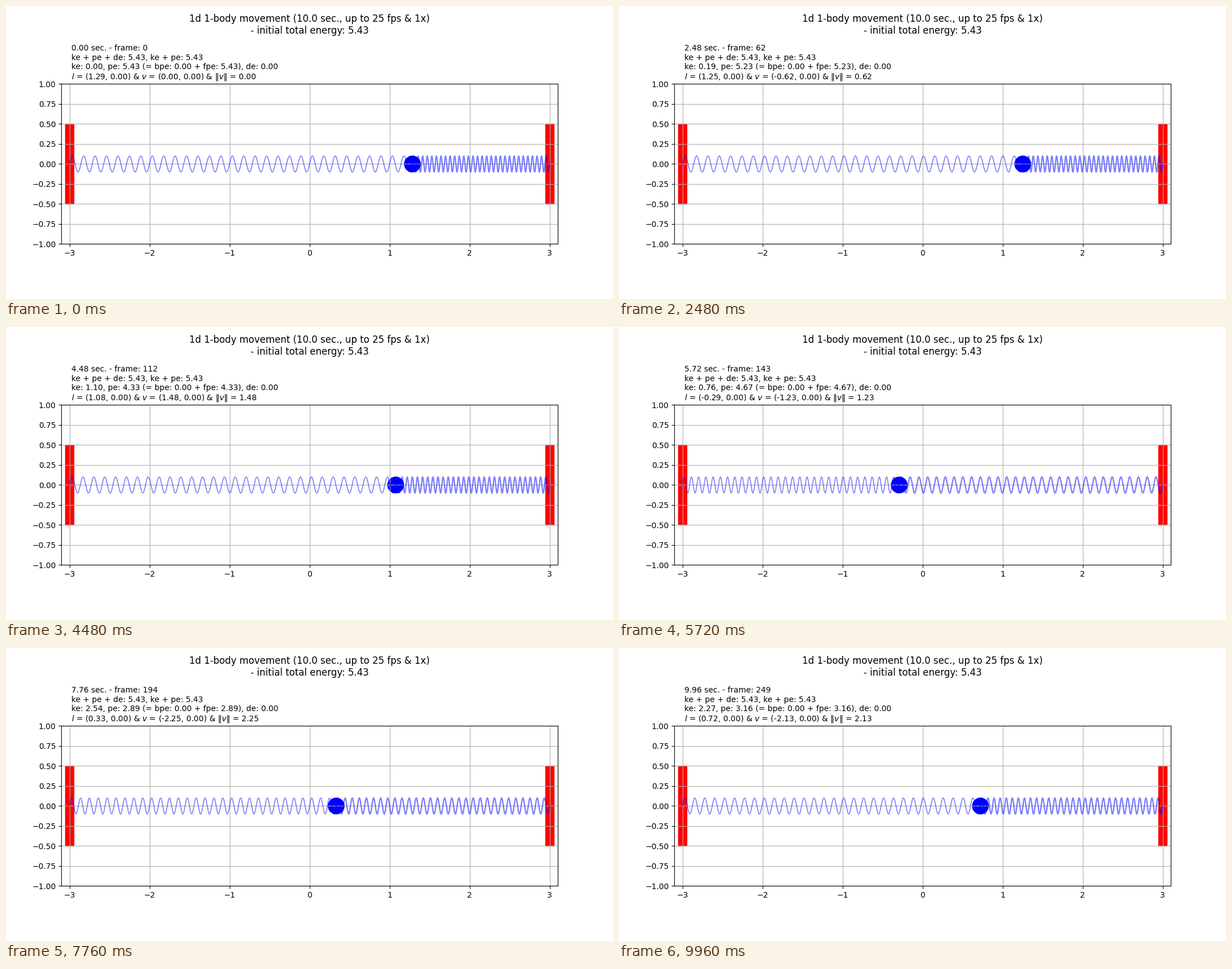
A matplotlib script that plays this animation: 1077x520 px, repeating every 10 s.

```python
import math

import matplotlib.pyplot as plt
import numpy as np
from matplotlib.animation import FuncAnimation
from matplotlib.patches import Circle, Rectangle

W, H, DPI = 1077, 520, 100
FPS, SECONDS = 25, 10

# A unit mass between two walls, held by springs of rest length 2.
WALL = 3.0
K_LEFT, K_RIGHT, REST = 2.0, 5.0, 2.0
K = K_LEFT + K_RIGHT
CENTER = (K_RIGHT - K_LEFT) * (WALL - REST) / K
START = 9 / 7
OMEGA = math.sqrt(K)
COILS, COIL_HEIGHT = 30, 0.1

plt.rcParams["font.family"] = "DejaVu Sans"


def potential(x):
    left = x + WALL - REST
    right = WALL - x - REST
    return 0.5 * (K_LEFT * left**2 + K_RIGHT * right**2)


def state(t):
    amp = START - CENTER
    x = CENTER + amp * math.cos(OMEGA * t)
    v = -amp * OMEGA * math.sin(OMEGA * t) + 0.0
    return x, v


def coil(x0, x1):
    s = np.linspace(0, 1, COILS * 40 + 1)
    return x0 + (x1 - x0) * s, COIL_HEIGHT * np.sin(2 * np.pi * COILS * s)


UNIT = 142.0
ax_w, ax_h = 6.2 * UNIT, 2 * UNIT
fig = plt.figure(figsize=(W / DPI, H / DPI), dpi=DPI, facecolor="white")
ax = fig.add_axes([(W - ax_w) / 2 / W, 97.6 / H, ax_w / W, ax_h / H])
ax.set_xlim(-3.1, 3.1)
ax.set_ylim(-1, 1)
ax.set_xticks(range(-3, 4))
ax.set_yticks(np.linspace(-1, 1, 9))
ax.grid(True)

energy = potential(START)
fig.text(0.5, 1 - 49 / H,
         f"1d 1-body movement ({SECONDS:.1f} sec., up to {FPS} fps & 1x)\n"
         f"- initial total energy: {energy:.2f}",
         ha="center", va="baseline", fontsize=12)

for wall_x in (-WALL, WALL):
    ax.add_patch(Rectangle((wall_x - 0.05, -0.5), 0.1, 1, color="red"))
ball = ax.add_patch(Circle((START, 0), 0.1, color="blue"))
left_spring, = ax.plot([], [], color="blue", alpha=0.5, lw=1.2)
right_spring, = ax.plot([], [], color="blue", alpha=0.5, lw=1.7)
info = ax.text(0.02, 1.03, "", transform=ax.transAxes, fontsize=10)


def update(frame):
    t = frame / FPS
    x, v = state(t)
    ke, pe = 0.5 * v * v, potential(x)
    ball.center = (x, 0)
    left_spring.set_data(*coil(-WALL, x))
    right_spring.set_data(*coil(x, WALL))
    info.set_text(
        f"{t:.2f} sec. - frame: {frame}\n"
        f"ke + pe + de: {ke + pe:.2f}, ke + pe: {ke + pe:.2f}\n"
        f"ke: {ke:.2f}, pe: {pe:.2f} (= bpe: 0.00 + fpe: {pe:.2f}), de: 0.00\n"
        f"$l$ = ({x:.2f}, 0.00) & $v$ = ({v:.2f}, 0.00) & "
        rf"$\|v\|$ = {abs(v):.2f}")
    return ball, left_spring, right_spring, info


anim = FuncAnimation(fig, update, frames=FPS * SECONDS, interval=1000 / FPS,
                     init_func=lambda: update(0), repeat=True, repeat_delay=0)
plt.show()
```
